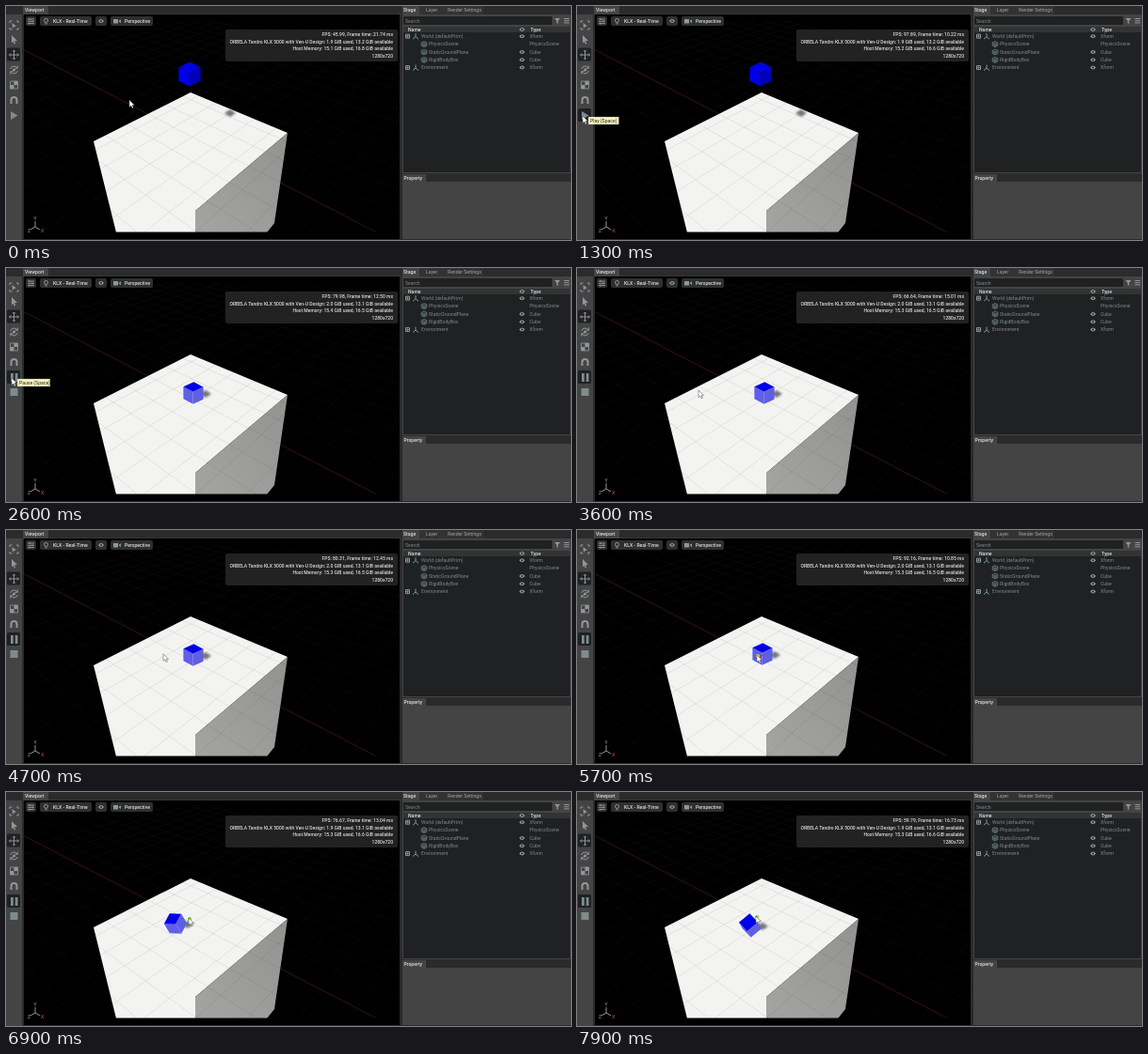
Recreate the animation shown at these times as an HTML page. Size 600x249 px, loop 8000 ms.

```html
<!DOCTYPE html>
<html lang="en">
<head>
<meta charset="utf-8">
<title>Rigid body simulation</title>
<style>
  html, body { margin: 0; width: 100%; height: 100%; overflow: hidden; background: #2b2b2b; }
  svg { display: block; width: 600px; height: 249px; }
  text { font: 5.1px Roboto, sans-serif; fill: #a2a5a5; white-space: pre; }
  .bright { fill: #dcdcdc; font-weight: 500; }
  .stat { font-size: 5px; text-anchor: end; }
  .dim text { fill: #7f8a8c; }
  .line { fill: none; stroke: #8f9898; stroke-width: 1; }
  .solid { fill: #8f9898; stroke: none; }
</style>
</head>
<body>
<svg viewBox="0 0 600 249">
  <defs>
    <clipPath id="view"><rect x="19" y="16" width="399" height="224.4"/></clipPath>
    <linearGradient id="side" x1="0" y1="1" x2="1" y2="0">
      <stop offset="0" stop-color="#a4a4a2"/><stop offset="1" stop-color="#929290"/>
    </linearGradient>
    <filter id="soft" x="-50%" y="-50%" width="200%" height="200%"><feGaussianBlur stdDeviation=".8"/></filter>
    <g id="eye">
      <path d="M-3 0Q0-4 3 0Q0 4-3 0Z" class="solid"/><circle r="1" fill="#26282a"/>
    </g>
    <path id="box" d="M0-3L3-1.6V1.8L0 3.2L-3 1.8V-1.6ZM-3-1.6L0-.2L3-1.6M0-.2V3.2"
      fill="#49545a" stroke="#6f7c80" stroke-width=".5"/>
    <path id="xform" d="M0-3V.5L-3 3M0 .5L3 3" fill="none" stroke="#7fa9a8" stroke-width=".9"/>
  </defs>

  <!-- Window frame -->
  <rect width="600" height="249" fill="#2b2b2b"/>
  <rect y="9" width="17" height="240" fill="#444"/>
  <path d="M18 0H45V9H18Z" fill="#444"/>
  <rect x="18" y="8.5" width="401" height="1" fill="#444"/>
  <rect x="19" y="9" width="399" height="239" fill="#000"/>
  <text class="bright" x="20" y="5.6">Viewport</text>

  <!-- Scene -->
  <g clip-path="url(#view)" fill="none">
    <use href="#grid" stroke="#fff" stroke-opacity=".05"/>
    <path id="axis" stroke="#5a1c1c" stroke-width=".6"/>
    <path d="M196 92L299 135L201 218V241H117L93 144Z" fill="#f3f3f2"/>
    <path d="M299 135L285 231L277 241H201V218Z" fill="url(#side)"/>
    <g stroke="#000" stroke-opacity=".15"><path id="grid" stroke-width=".5"/></g>
    <path id="shadow" d="M-6 0L0-4L6 0L0 4Z" fill="#777" filter="url(#soft)"/>
    <g id="cube"></g>
    <g id="drag">
      <path id="pull" d="M1 1L6-1" stroke="#e02020" stroke-width="1.2"/>
      <circle id="grip" r="2"/>
    </g>
  </g>
  <path class="line" stroke-width=".8" d="M31 229V235L26 238M31 235L36 238"/>
  <text x="29.5" y="228">Y</text><text x="23" y="241">Z</text>
  <text x="37" y="241" style="fill:#c55">X</text>

  <!-- Viewport controls -->
  <g fill="#2d2f31">
    <rect x="21" y="11" width="11" height="10" rx="2"/><rect x="36" y="11" width="55" height="10" rx="2"/>
    <rect x="95" y="11" width="12" height="10" rx="2"/><rect x="111" y="11" width="45" height="10" rx="2"/>
  </g>
  <path class="line" d="M23 14H30M23 16.3H30M23 18.6H30M25 13V15M28 15.3V17.3M25 17.6V19.6" stroke-width=".8"/>
  <circle class="line" cx="42.5" cy="15.4" r="2"/><path class="line" d="M41.3 18.8H43.7"/>
  <text class="bright" x="50" y="18">KLX - Real-Time</text>
  <use href="#eye" x="101" y="16"/>
  <path class="solid" d="M114 14H119V18.5H114ZM119.5 16L122 14.3V18.2Z"/>
  <text class="bright" x="126" y="18">Perspective</text>
  <rect x="233" y="25" width="183" height="34" rx="2" fill="#222"/>
  <g id="stats"></g>

  <!-- Toolbar -->
  <rect x="1" y="44.5" width="14" height="14" rx="1.5" fill="#1f2123"/>
  <g class="line">
    <path d="M4 18V16H6.5M11 16H13V18M13 23V25H11M6.5 25H4V23"/>
    <path class="solid" d="M6.5 18L11 21.5L8.5 22L7 24ZM6 31L12 37L9 37.3L10.2 40L8.8 40.5L7.6 37.8L6 39.5Z"/>
    <path d="M8.5 47V57M3.5 52H13.5M7 48.5L8.5 47L10 48.5M7 55.5L8.5 57L10 55.5M5 50.5L3.5 52L5 53.5M12 50.5L13.5 52L12 53.5"/>
    <path d="M4.7 67A4 4 0 0 1 12 66M12.3 69A4 4 0 0 1 5 70M12.3 63.5V66.3H9.5M4.7 72.5V69.7H7.5"/>
    <circle class="solid" cx="8.5" cy="68" r="1.6"/>
    <path d="M4.5 80H12.5V88H4.5Z" stroke-width=".8"/>
    <path class="solid" d="M8.5 80H12.5V84H8.5ZM4.5 84H8.5V88H4.5Z"/>
    <path d="M5.5 104V100A3 3 0 0 1 11.5 100V104" stroke-width="2"/>
  </g>
  <rect id="hover" x="1" y="109" width="14" height="14" rx="1.5" fill="#1f2123"/>
  <path id="play" d="M5 112V121L12.5 116.5Z" fill="#7e8c8c"/>
  <path id="running" d="M5 112H7.8V121H5ZM9.7 112H12.5V121H9.7ZM4.5 128H12.5V136H4.5Z" fill="#7e8c8c"/>

  <!-- Stage and property panels -->
  <rect x="439" width="68" height="9" fill="#333"/>
  <g fill="#444">
    <rect x="421" width="18" height="9"/><rect x="421" y="9" width="179" height="169"/>
    <rect x="421" y="179" width="25" height="9"/><rect x="421" y="187" width="179" height="61"/>
  </g>
  <rect x="422" y="11" width="158" height="9" rx="1" fill="#1f2123"/>
  <rect x="422" y="22" width="177" height="155" fill="#1f2123"/>
  <rect x="422" y="22" width="177" height="6" fill="#323434"/>
  <text class="bright" x="422" y="5.6">Stage</text>
  <text x="446" y="5.6">Layer</text><text x="469" y="5.6">Render Settings</text>
  <text class="bright" x="422.5" y="185">Property</text>
  <g class="dim"><text x="424" y="17.5">Search</text></g>
  <path class="solid" d="M582.5 13H588.5L586.2 15.8V19L584.8 18V15.8Z"/>
  <path class="line" d="M592.5 13.5H598M592.5 15.7H598M592.5 17.9H598" stroke-width=".9"/>
  <text class="bright" x="427" y="27">Name</text><text class="bright" x="557" y="27">Type</text>
  <use href="#eye" x="548" y="25"/>
  <g id="tree" class="dim"></g>

  <g id="tip">
    <rect x="12" y="118" height="8" fill="#f8f5c4" stroke="#777" stroke-width=".4"/>
    <text x="14" y="123.8" style="fill:#222"></text>
  </g>
  <path id="cursor" d="M0 0V7.6L1.8 6L3 8.8L4.3 8.2L3.1 5.6H5.5Z" fill="#fff" stroke="#444" stroke-width=".5"/>
</svg>
<script>
const $ = id => document.getElementById(id);
const { sin, cos, min, max, floor, PI } = Math;
const LOOP = 8000, PLAY = 1700, GRAB = 5500, PUSH = 6400;

// Perspective of the ground plane: (0..1, 0..1) is the top of the big block
const G = -.1836, H = -.2129;
const ground = (u, v) => {
  const w = 1 + G * u + H * v;
  return [(48.1 * u - 122.8 * v + 196) / w, (18.2 * u + 21.3 * v + 92) / w];
};
const alongU = v => `M${ground(-6, v)}L${ground((.8 + H * v) / -G, v)}`;
const alongV = u => `M${ground(u, -6)}L${ground(u, (.8 + G * u) / -H)}`;
let lines = '';
for (let k = -12; k <= 12; k++) lines += alongU(.5 + k / 5) + alongV(.5 + k / 5);
$('grid').setAttribute('d', lines);
$('axis').setAttribute('d', alongU(.5));

// Stage tree: name, type, depth
$('tree').innerHTML = [
  ['World (defaultPrim)', 'Xform', 0],
  ['PhysicsScene', 'PhysicsScene', 1],
  ['StaticGroundPlane', 'Cube', 1],
  ['RigidBodyBox', 'Cube', 1],
  ['Environment', 'Xform', 0]
].map(([name, type, depth], i) => {
  const y = 32.2 + i * 8.35;
  const toggle = `<path class="line" stroke-width=".6" d="M424.5 ${y - 2}h4v4h-4zM425.3 ${y}h2.4M426.5 ${y - 1.2}v2.4"/>`;
  return (depth ? '' : toggle) +
    `<use href="#${depth ? 'box' : 'xform'}" x="${435 + depth * 9}" y="${y}"/>` +
    `<text x="${441 + depth * 8}" y="${y + 1.8}">${name}</text>` +
    `<text x="556" y="${y + 1.8}">${type}</text>` +
    (type === 'PhysicsScene' ? '' : `<use href="#eye" x="548" y="${y}"/>`);
}).join('');

for (let i = 0; i < 4; i++)
  $('stats').innerHTML += `<text class="bright stat" x="411" y="${32 + i * 7.7}"></text>`;

// Follows moves of the form [start, duration, goal] with a smooth ease
const follow = (from, moves, t) => moves.reduce((now, [start, span, goal]) => {
  const f = max(0, min(1, (t - start) / span)), e = f * f * (3 - 2 * f);
  return now.map((n, i) => n + (goal[i] - n) * e);
}, from);
const hold = (steps, t) => steps.findLast(([start]) => start <= t)[1];

const cursorMoves = [[250, 600, [6, 117]], [2850, 600, [129, 130]], [4200, 900, [194, 133]],
  [GRAB, 200, [191, 133]], [PUSH, 500, [194, 134]], [7200, 700, [190, 132]]];
// Cube pose: x, y, yaw, pitch, roll in degrees
const restPose = [199, 133, 43, 30, 0];
const cubeMoves = [[GRAB, 200, [197, 132, 43, 30, 0]], [PUSH, 500, [180, 140, 43.6, 39, -31]],
  [7200, 700, [184, 142, 10, 60, -31]]];
const fpsMoves = [[0, 1300, [97.89]], [1300, 1300, [79.98]], [2600, 1000, [66.64]],
  [3600, 2100, [92.16]], [5700, 1200, [76.67]], [6900, 1000, [59.79]]];
const gpu = [[0, '1.9 GiB used, 13.2'], [PLAY, '2.0 GiB used, 13.1'], [PUSH, '1.9 GiB used, 13.1']];
const host = [[0, '15.1 GiB used, 16.8'], [900, '15.2 GiB used, 16.6'], [PLAY, '15.4 GiB used, 16.5'],
  [3100, '15.3 GiB used, 16.5'], [PUSH, '15.3 GiB used, 16.6']];
const tips = [[0, ''], [1150, 'Play (Space)'], [PLAY, ''], [2150, 'Pause (Space)'], [2900, '']];

const show = (el, on) => el.style.display = on ? '' : 'none';
const move = (el, x, y) => el.setAttribute('transform', `translate(${x} ${y})`);

// Screen x, y and depth of a cube axis after yaw, pitch and roll
function turn([x, y, z], angles) {
  const [a, p, r] = angles.map(d => d * PI / 180);
  const sx = x * cos(a) + z * sin(a), sz = z * cos(a) - x * sin(a);
  const sy = sz * sin(p) - y * cos(p);
  return [sx * cos(r) - sy * sin(r), sx * sin(r) + sy * cos(r), sz * cos(p) + y * sin(p)];
}

function drawCube(x, y, size, angles, lit) {
  const axes = [[1, 0, 0], [0, 1, 0], [0, 0, 1]].map(v => turn(v, angles));
  $('cube').innerHTML = axes.map((axis, i) => {
    const n = axis.map(c => axis[2] < 0 ? -c : c);
    const a = axes[(i + 1) % 3], b = axes[(i + 2) % 3];
    const corners = [[1, 1], [1, -1], [-1, -1], [-1, 1]].map(([j, k]) =>
      [x + size * (n[0] + j * a[0] + k * b[0]), y + size * (n[1] + j * a[1] + k * b[1])]);
    const glow = i === 1 ? 0 : 95 * lit;
    const blue = n[0] > 0 && i !== 1 ? 185 + 40 * lit : 232;
    return `<polygon points="${corners.join(' ')}" fill="rgb(${glow},${glow},${blue})"/>`;
  }).join('');
}

function draw(t) {
  const height = 1 - max(0, min(1, (t - PLAY - 50) / 500)) ** 2;
  const [x, y, ...angles] = follow(restPose, cubeMoves, t);
  drawCube(x - 4 * height, y - 60.5 * height, 7.5 + .7 * height, angles, 1 - height);
  move($('shadow'), x + 13 + 26 * height, y + 1 - 20 * height);

  const [px, py] = follow([131, 100], cursorMoves, t);
  move($('cursor'), px, py);
  move($('drag'), px + 1, py + 1);
  show($('drag'), t >= GRAB);
  show($('pull'), t < PUSH);
  $('grip').setAttribute('fill', t < PUSH ? '#d8d820' : '#70d820');

  const running = t >= PLAY;
  show($('play'), !running);
  show($('running'), running);
  show($('hover'), running || t > 850);
  const tip = hold(tips, t), [plate, label] = $('tip').children;
  show($('tip'), tip);
  label.textContent = tip;
  plate.setAttribute('width', 3 + tip.length * 2.45);

  const [fps] = follow([45.99], fpsMoves, floor(t / 100) * 100);
  [`FPS: ${fps.toFixed(2)}, Frame time: ${(1000 / fps).toFixed(2)} ms`,
    `ORBELA Tandro KLX 5000 with Ven-U Design: ${hold(gpu, t)} GiB available`,
    `Host Memory: ${hold(host, t)} GiB available`,
    '1280x720'].forEach((s, i) => $('stats').children[i].textContent = s);
}

const start = performance.now();
function frame() {
  draw((performance.now() - start) % LOOP);
  requestAnimationFrame(frame);
}
frame();
</script>
</body>
</html>
```
